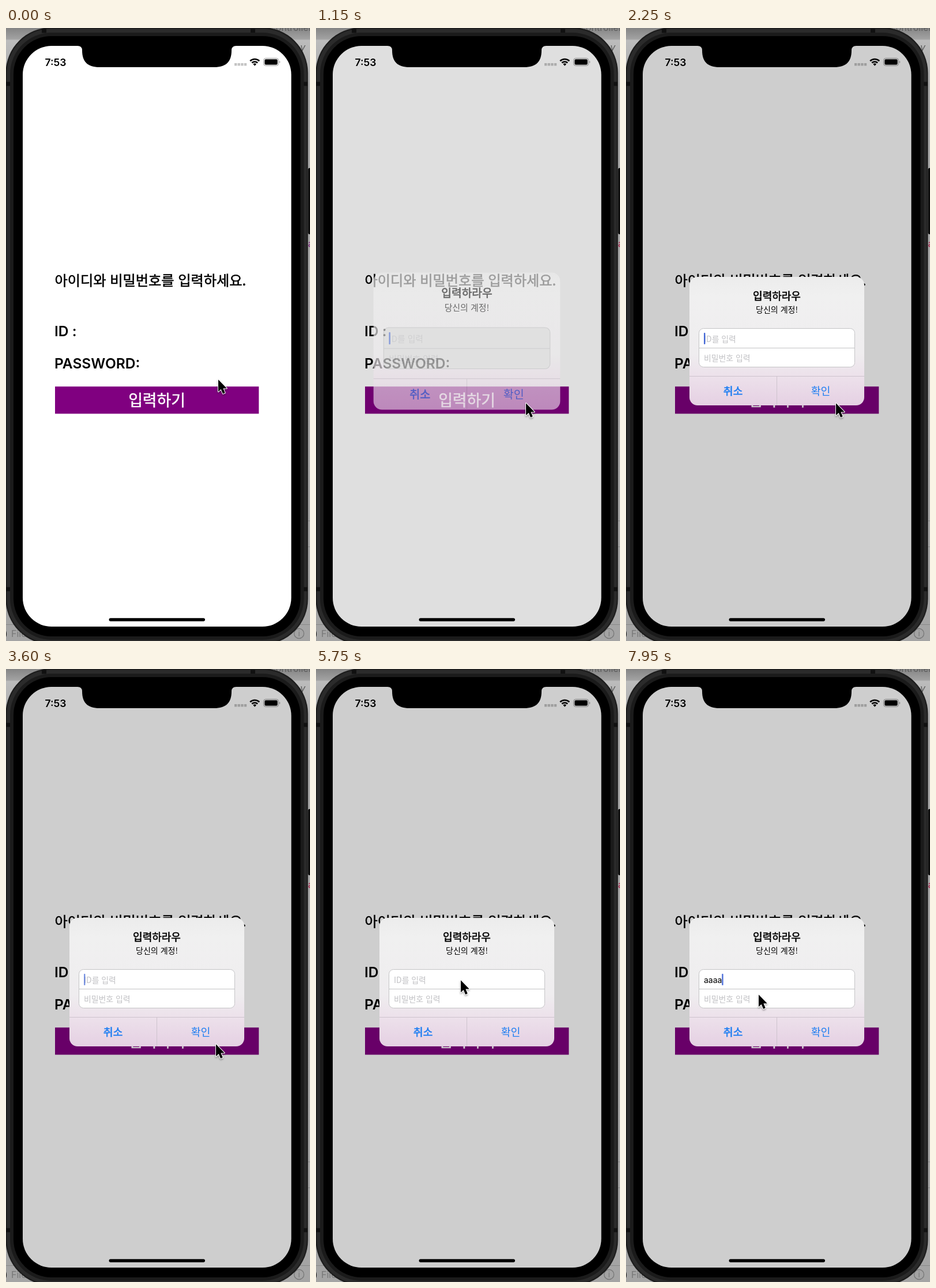
Write an HTML page that moves like this. It is 527 by 1064 pixels and loops after 8 s.

```html
<!DOCTYPE html>
<html lang="ko">
<head>
<meta charset="utf-8">
<style>
html, body { margin: 0; width: 100%; height: 100%; overflow: hidden; background: #a6a6a6; }
svg { display: block; width: 527px; height: 1064px; font-family: Inter, "Noto Sans CJK KR", "Noto Sans CJK", sans-serif; }
.ko { font-family: "Noto Sans CJK KR", "Noto Sans CJK", sans-serif; }
.mid { text-anchor: middle; }
.medium { stroke-width: .6px; }
</style>
</head>
<body>
<svg viewBox="0 0 527 1064">
  <defs>
    <linearGradient id="backdrop" x2="0" y2="1">
      <stop offset="0" stop-color="#858585"/>
      <stop offset=".018" stop-color="#a2a2a2"/>
      <stop offset=".02" stop-color="#bcbcbc"/>
      <stop offset=".1" stop-color="#a8a8a8"/>
      <stop offset="1" stop-color="#a4a4a4"/>
    </linearGradient>
    <linearGradient id="glass" x2="0" y2="1">
      <stop offset="0" stop-color="#ececec"/>
      <stop offset=".15" stop-color="#f0f0f0"/>
      <stop offset=".6" stop-color="#efedef"/>
      <stop offset=".8" stop-color="#ecdfea"/>
      <stop offset="1" stop-color="#e5d0e3"/>
    </linearGradient>
    <clipPath id="screen"><rect x="29" y="31" width="465.5" height="1008" rx="50"/></clipPath>
    <filter id="soft" x="-50%" y="-50%" width="200%" height="200%">
      <feDropShadow dx="0" dy="2" stdDeviation="1.6" flood-opacity=".35"/>
    </filter>
  </defs>

  <!-- desktop behind the device -->
  <rect width="527" height="1064" fill="url(#backdrop)"/>
  <g fill="#5c5c5c" font-size="16">
    <text x="456" y="5">Controller</text>
    <text x="510" y="39" font-style="italic">y</text>
    <text x="-3" y="1057" fill="#222">)</text>
    <text x="9" y="1057" fill="#777">File</text>
    <circle cx="508" cy="1051" r="8.5" fill="none" stroke="#777" stroke-width="1.3"/>
    <text x="508" y="1056" font-size="13" fill="#777" class="mid">i</text>
  </g>
  <path d="M520 855.5h7M520 900.5h7M0 1035.5h527" stroke="#888"/>
  <text id="edge" x="523.5" y="380" font-size="16">a</text>

  <!-- device body -->
  <rect x="523.5" y="243" width="8" height="115" rx="3" fill="#0c0c0c"/>
  <rect x="-.5" y="-1" width="524" height="1071" rx="79" fill="#1d1d1d"/>
  <rect x="1.5" y="1.5" width="520" height="1066" rx="77" fill="#2b2b2b"/>
  <path d="M62 5h8M424 5h8M0 97h7M0 974h7M516 97h7M516 974h7" stroke="#111" stroke-width="7"/>
  <rect x="7" y="8" width="509.5" height="1054" rx="72" fill="#1b1b1b"/>
  <rect x="13" y="14" width="497.5" height="1042" rx="66"/>

  <g clip-path="url(#screen)">
    <rect x="29" y="31" width="466" height="1008" fill="#fff"/>
    <text x="67.5" y="65.5" font-size="17.5" font-weight="600">7:53</text>
    <path d="M396 63.2h21.5" stroke="#c4c4c4" stroke-width="4.4" stroke-dasharray="4.4 1.2"/>
    <g fill="none" stroke="#000" stroke-width="2.6">
      <path d="M423.2 57.2a11.6 11.6 0 0 1 16 0M426.3 60.5a7.1 7.1 0 0 1 9.8 0"/>
      <path d="M428.4 62.7a4 4 0 0 1 5.6 0L431.2 65.8z" fill="#000" stroke="none"/>
    </g>
    <rect x="446.5" y="52.5" width="26" height="13" rx="3.8" fill="none" stroke="#999"/>
    <rect x="448.3" y="54.3" width="22.4" height="9.4" rx="2.2"/>
    <path d="M474 56.8a2.6 2.6 0 0 1 0 4.4z" fill="#999"/>

    <text x="84.5" y="446.5" font-size="24.2" stroke="#000" class="ko medium">아이디와 비밀번호를 입력하세요.</text>
    <g font-size="24.5" font-weight="600">
      <text x="84" y="534.5">ID :</text>
      <text x="84" y="590.5">PASSWORD:</text>
    </g>
    <rect x="85" y="622.3" width="353.3" height="47.2" fill="#800080"/>
    <text x="261.5" y="655.5" font-size="26.8" fill="#fff" stroke="#fff" class="ko mid medium">입력하기</text>
    <rect id="dim" x="29" y="31" width="466" height="1008"/>
    <rect x="178.5" y="1024.3" width="166.5" height="5.4" rx="2.7"/>

    <g id="alert">
      <rect x="110" y="432" width="303" height="223" rx="14" fill="url(#glass)"/>
      <path d="M110 604.5h303M261.5 604.5v50.5" stroke="#cdc3cd"/>
      <rect id="field" x="126.5" y="521.5" width="270" height="67" rx="8" stroke="#c3c3c5"/>
      <path d="M127 555.5h269" stroke="#c3c3c5"/>
      <g id="labels">
        <text x="261.5" y="472" font-size="18" stroke="#000" class="ko mid medium">입력하라우</text>
        <text x="261.5" y="494" font-size="14" class="ko mid">당신의 계정!</text>
        <g font-size="13.9" fill="#c1c1c4" class="ko">
          <text id="hint" x="135" y="545">ID를 입력</text>
          <text x="135" y="578">비밀번호 입력</text>
        </g>
        <text id="typed" x="135" y="545" font-size="14"></text>
        <rect id="caret" x="135" y="529" width="2.4" height="20" rx="1" fill="#4468d6"/>
        <g font-size="18.3" fill="#1c7df2" class="ko mid">
          <text x="185.5" y="636.5" stroke="#1c7df2" class="medium">취소</text>
          <text x="337.5" y="636.5">확인</text>
        </g>
      </g>
    </g>
  </g>

  <!-- notch -->
  <path d="M124 30v1q8 0 8 8c0 20 10 29 30 29H361c20 0 30 -9 30 -29q0 -8 8 -8v-1z"/>

  <path id="pointer" d="M1 2.2v21l4.7 -4.3l3.4 8l3.6 -1.6l-3.3 -7.8h6.4z" stroke="#fff" stroke-width="2" stroke-linejoin="round" paint-order="stroke" filter="url(#soft)"/>
</svg>
<script>
const LOOP = 8000;
const $ = id => document.getElementById(id);
const clamp = v => Math.min(1, Math.max(0, v));

// [time, x, y] stops of the pointer tip
const route = [[0, 367, 608], [150, 363, 649], [4875, 363, 649], [4950, 326, 626],
  [5250, 250, 538], [6800, 250, 538], [7250, 229, 563], [LOOP, 229, 563]];
const keyTimes = [6150, 6400, 6600, 6800];
const blinkTimes = [1550, 2550, 3550, 4550, 5550, 7430];
const FADE = 180, HIDDEN = 350;

function pointerAt(t) {
  const i = route.findIndex(stop => stop[0] > t);
  const [t0, x0, y0] = route[i - 1], [t1, x1, y1] = route[i];
  const k = (t - t0) / (t1 - t0), e = k * k * (3 - 2 * k);
  return [x0 + (x1 - x0) * e, y0 + (y1 - y0) * e];
}

function caretAlpha(t) {
  const start = blinkTimes.filter(b => b <= t).pop();
  if (start === undefined) return 1;
  const age = t - start;
  return clamp(1 - age / FADE) + clamp((age - HIDDEN) / FADE);
}

// critically damped spring, progress 0..1
function spring(ms) {
  const s = Math.max(0, ms) * 0.0228;
  return 1 - (1 + s) * Math.exp(-s);
}

function draw(t) {
  const p = spring(t - 1052);
  const scale = 1.2 - 0.2 * p;
  const grey = Math.round(170 + 85 * p);
  const count = keyTimes.filter(k => k <= t).length;

  $('dim').setAttribute('opacity', 0.192 * p);
  $('alert').setAttribute('opacity', p);
  $('alert').setAttribute('transform', `translate(261.5 543.5) scale(${scale}) translate(-261.5 -543.5)`);
  $('labels').setAttribute('opacity', Math.sqrt(p));
  $('field').setAttribute('fill', `rgb(${grey},${grey},${grey})`);
  $('edge').setAttribute('fill', t < 1050 ? '#7a1f78' : '#a81f48');
  $('hint').setAttribute('opacity', count ? 0 : 1);
  $('typed').textContent = 'a'.repeat(count);
  $('caret').setAttribute('x', 135 + 7.8 * count);
  $('caret').setAttribute('opacity', caretAlpha(t));
  $('pointer').setAttribute('transform', `translate(${pointerAt(t)})`);
}

function tick() {
  draw(performance.now() % LOOP);
  requestAnimationFrame(tick);
}
tick();
</script>
</body>
</html>
```
